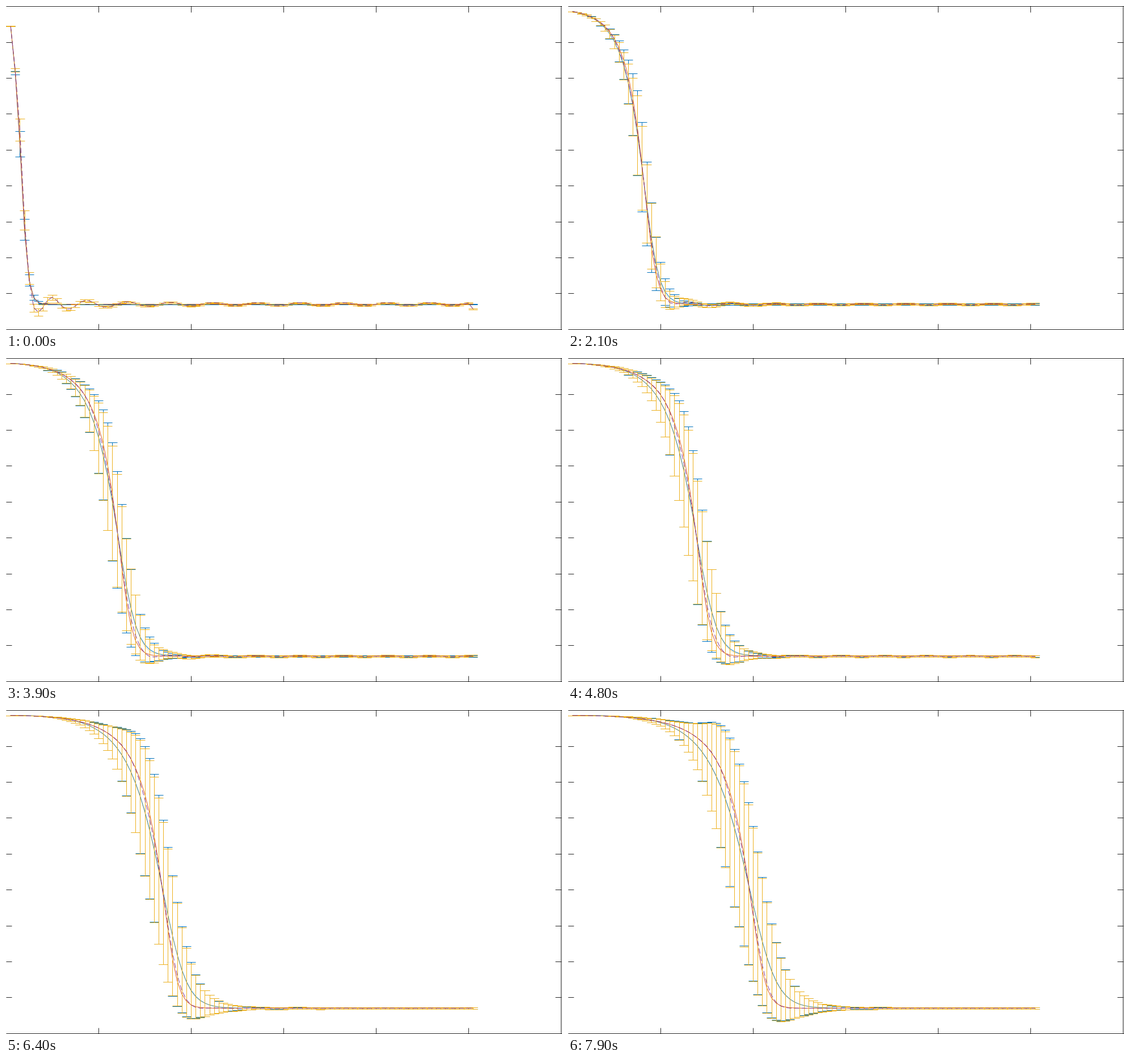
Write a matplotlib script that moves like this. It is 980x572 px and loops after 8 s.

```python
import numpy as np
import matplotlib.pyplot as plt
from matplotlib.animation import FuncAnimation

W, H, DPI = 980, 572, 100
FRAMES, STEP = 80, 100
PX = 72 / DPI
BLUE, ORANGE, YELLOW, PURPLE, INK = "#0072BD", "#D95319", "#EDB120", "#7E2F8E", "#262626"

TOP, DROP = 9.5, 517
WALL, GAP = 8, 8.15
MID = 0.58
X = GAP * np.arange(1, 102)

# Dense drop fractions, with the logs that shape shoulder and foot.
G = np.linspace(-9, 9, 600)
F = 1 / (1 + np.exp(-G))
SHOULDER, FOOT = np.log1p(np.exp(-G)), np.log1p(np.exp(G))


def front_pos(n):
    """Infiltration law: a square-root start plus a steady drift."""
    t = n + 1
    return WALL + 18 * np.sqrt(t) + 1.87 * t


def front(n, blur):
    """Drop fraction at every node; blur widens a single run into the mean."""
    x0 = front_pos(n)
    z = x0 - WALL
    s = (20 + 16 * blur) * SHOULDER + (6 - 3.8 * blur) * SHOULDER ** 2
    behind = z * np.tanh(0.062 * np.sqrt(z) * s / z)
    ahead = (11 + 9 * blur) * 1.05 * z / (z + 18) * FOOT
    u = ahead - behind
    u -= np.interp(MID, F, u)
    return np.interp(X, x0 + u, F, left=0, right=1)


def spread(n, f):
    """Half height of the error bars, largest in the middle of the drop."""
    amp = 0.155 + 0.845 * (np.sqrt(n + 1) - 1) / (np.sqrt(FRAMES) - 1)
    shape = np.sin(np.pi * f) ** (0.6 + 0.65 * np.exp(-(f / 0.22) ** 2))
    return 145 * shape * amp ** (1 + np.clip((0.43 - f) / 0.27, 0, 0.9)), amp


def ripple(n, u):
    """Ringing ahead of the front, with a strong overshoot at the start."""
    early = np.exp(-n / 2)
    gain = 0.55 * np.exp(-n / 3) + 0.5 * np.exp(-(n / 45) ** 2)
    size = gain * (3 + 14 * np.exp(-np.maximum(0, u - 29) / 70))
    sign = np.tanh(6 * np.sin(np.pi * (front_pos(n) / 38.2 - 0.65)))
    chirp = 0.93 * np.exp(-n / 3) * np.exp(-(X - 57) / 50)
    phase = np.pi * ((X - 289) / 38.2 + 7 - chirp)
    wave = sign * size * np.cos(phase) * np.clip((u - 8) / 20, 0, 1)
    wave += early * (14 * np.exp(-((u - 21) / 5) ** 2) - 28 * np.exp(-((u + 1) / 8) ** 2))
    wave[-1] += 11 * early
    return wave


def bars(mean, half):
    """Error bars with caps as one broken path."""
    lo, hi, gap = mean - half, mean + half, np.full_like(X, np.nan)
    left, right = X - GAP, X + GAP
    px = np.c_[X, X, gap, left, right, gap, left, right, gap]
    py = np.c_[lo, hi, gap, lo, lo, gap, hi, hi, gap]
    return px.ravel(), py.ravel()


fig = plt.figure(figsize=(W / DPI, H / DPI), dpi=DPI, facecolor="white")
ax = fig.add_axes([0, 0, 1, 1])
ax.set_xlim(0, W)
ax.set_ylim(H, 0)
ax.axis("off")


def line(color, width, xs=(), ys=(), **kw):
    return ax.plot(xs, ys, color=color, lw=width * PX, **kw)[0]


def rule(xs, ys):
    line(INK, 1, xs, ys, snap=True, solid_capstyle="butt", zorder=1)


rule([0, W], [0, 0])
rule([0, W], [571, 571])
rule([978, 978], [0, H])
for k in range(1, 6):
    for ends in ([0, 11], [561, H]):
        rule([163 * k, 163 * k], ends)
for k in range(1, 9):
    y = 0.2 + 63.4 * k
    for ends in ([0, 10], [968, 979]):
        rule(ends, [y, y])

blue_bars = line(BLUE, 1, snap=True, solid_capstyle="butt", zorder=2)
blue_mean = line(BLUE, 0.9, zorder=3)
single = line(ORANGE, 0.9, zorder=4)
yellow_bars = line(YELLOW, 1, snap=True, solid_capstyle="butt", zorder=5)
yellow_mean = line(YELLOW, 0.9, alpha=0.45, zorder=6)
dashed = line(PURPLE, 0.9, ls=(0, (10, 5)), dash_capstyle="butt", zorder=7)
artists = [blue_bars, blue_mean, single, yellow_bars, yellow_mean, dashed]


def draw(n):
    f = front(n, n / (FRAMES - 1))
    mean, one = TOP + DROP * f, TOP + DROP * front(n, 0)
    half, amp = spread(n, f)

    u = X - front_pos(n)
    wave = ripple(n, u)
    wobble = -14 * (1 - np.exp(-n / 4)) * np.sin(np.pi * u / 55) * np.exp(-(u / 45) ** 2)
    wobble *= np.clip((X - X[0]) / 40, 0, 1)
    approx = mean + wave + wobble * np.exp(-n / 20) + 0.017 * half

    ahead = u > 0
    tail = 0.8 + amp + 5 * np.exp(-np.maximum(0, u - 30) / 60)
    blue_half = np.hypot(half, ahead * (0.4 + 1.2 * amp))
    yellow_half = np.hypot(half * (1 - 0.14 * np.exp(-n / 27)), ahead * tail)

    blue_bars.set_data(*bars(mean, blue_half))
    blue_mean.set_data(X, mean)
    single.set_data(X, one)
    yellow_bars.set_data(*bars(approx, yellow_half))
    yellow_mean.set_data(X, approx)
    dashed.set_data(X, one + wave + wobble)
    return artists


anim = FuncAnimation(fig, draw, frames=FRAMES, interval=STEP, repeat=True, repeat_delay=0)
plt.show()
```
